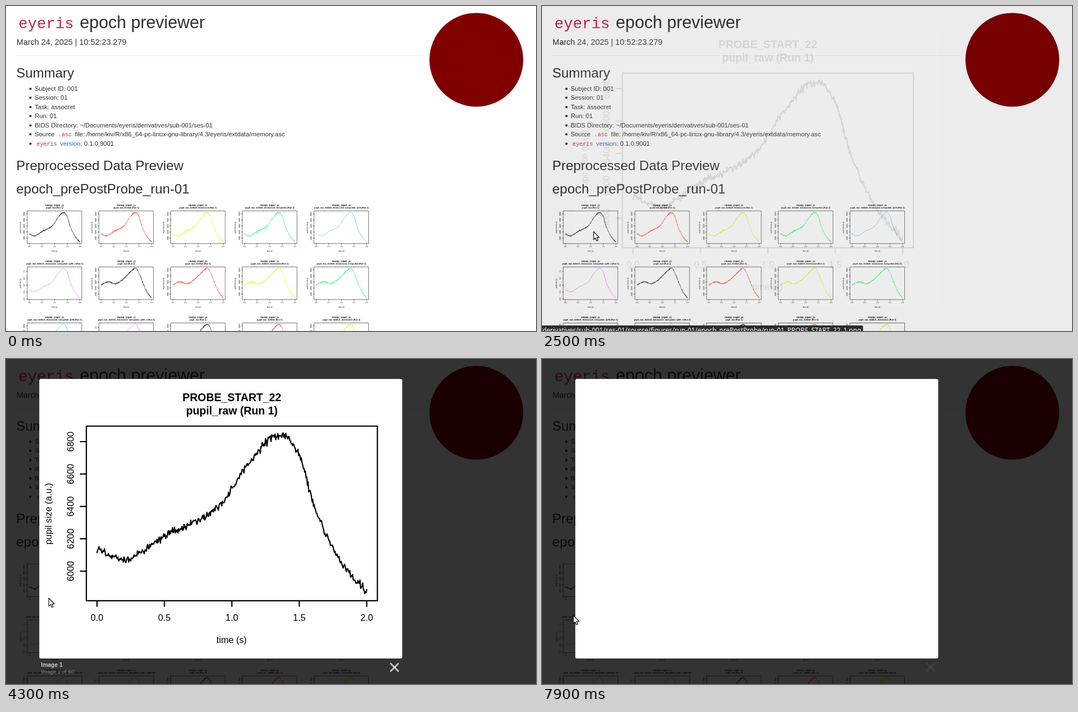
Recreate the animation shown at these times as an HTML page with a canvas. Size 955 by 586 pixels, loop 8000 ms.

```html
<!DOCTYPE html>
<html lang="en">
<head>
<meta charset="utf-8">
<title>eyeris epoch previewer</title>
<style>
html, body { margin: 0; width: 100%; height: 100%; overflow: hidden; background: #fff; }
canvas { display: block; }
</style>
</head>
<body>
<canvas id="stage" width="955" height="586"></canvas>
<script>
const W = 955, H = 586, LOOP = 8000, TICK = 100;
const SANS = '"Liberation Sans", Arial, sans-serif';
const MONO = '"Liberation Mono", monospace';
const UI = '"Noto Sans", sans-serif';
const PANEL = { x: 60, y: 36, w: 654, h: 504 };
const PLOT = { x: 144.8, y: 121, w: 524.4, h: 314.8 };
const AXIS = { x: 164, w: 486 };
const THUMB = { x: 22.7, y: 353.6, dx: 129.2, dy: 101, scale: 0.187 };
const INK = '#2f2f2f', RED = '#c7254e', LINK = '#3366bb';

const STAGES = ['raw', 'deblink', 'detransient', 'interpolate', 'lpfilt', 'z'];
const COLORS = ['#000', '#ff2a1a', '#cf0', '#0f6', '#3b8bf0', '#c3f'];

// Key points of the two pupil responses.
const RISE = [[164, 343], [218, 361], [290, 316], [330, 299], [388, 261], [435, 191],
  [490, 136], [526, 168], [558, 272], [600, 360], [650, 420]];
const BUMP = [[164, 294], [232, 264], [301, 283], [381, 234], [467, 150], [504, 137],
  [563, 263], [600, 352], [650, 421]];

const clamp = u => Math.min(Math.max(u, 0), 1);
const swing = u => 0.5 - Math.cos(clamp(u) * Math.PI) / 2;
const easeOut = u => 1 - (1 - clamp(u)) ** 2;

function spline(pts, x) {
  let i = 0;
  while (i < pts.length - 2 && pts[i + 1][0] < x) i++;
  const a = pts[i], b = pts[i + 1];
  const p = pts[Math.max(i - 1, 0)], n = pts[Math.min(i + 2, pts.length - 1)];
  const d = b[0] - a[0], u = (x - a[0]) / d;
  const m0 = (b[1] - p[1]) / (b[0] - p[0]) * d, m1 = (n[1] - a[1]) / (n[0] - a[0]) * d;
  const u2 = u * u, u3 = u2 * u;
  return (2 * u3 - 3 * u2 + 1) * a[1] + (u3 - 2 * u2 + u) * m0 +
    (3 * u2 - 2 * u3) * b[1] + (u3 - u2) * m1;
}

function random(seed) {
  return () => {
    seed = (seed * 1664525 + 1013904223) >>> 0;
    return seed / 4294967296;
  };
}

function layer(w, h, paint) {
  const c = document.createElement('canvas');
  c.width = w;
  c.height = h;
  paint(c.getContext('2d'));
  return c;
}

function text(g, str, x, y, font, color, align = 'left') {
  g.font = font;
  g.fillStyle = color;
  g.textAlign = align;
  g.fillText(str, x, y);
}

function upright(g, str, x, y, font) {
  g.save();
  g.translate(x, y);
  g.rotate(-Math.PI / 2);
  text(g, str, 0, 0, font, '#000', 'center');
  g.restore();
}

function segment(g, x1, y1, x2, y2) {
  g.beginPath();
  g.moveTo(x1, y1);
  g.lineTo(x2, y2);
  g.stroke();
}

function disc(g, x, y, r, color) {
  g.fillStyle = color;
  g.beginPath();
  g.arc(x, y, r, 0, 2 * Math.PI);
  g.fill();
}

function trace(g, probe, step) {
  const pts = probe === 23 ? BUMP : RISE;
  const rnd = random(probe * 977);
  const jitter = step > 3 ? 0 : 7, n = 400;
  g.beginPath();
  for (let i = 0; i <= n; i++) {
    const x = AXIS.x + AXIS.w * i / n;
    g.lineTo(x, spline(pts, x) + (rnd() + rnd() + rnd() - 1.5) * jitter);
  }
  g.stroke();
}

// Draws one chart in the coordinates of the full-size panel.
function chart(g, probe, step, lineWidth) {
  const font = '16.4px ' + SANS, bold = 'bold 19.7px ' + SANS;
  const scored = step === 5;
  const name = 'pupil_' + STAGES.slice(0, step + 1).join('_');
  text(g, 'PROBE_START_' + probe, 407, 76, bold, '#000', 'center');
  text(g, name + ' (Run 1)', 407, 99.5, bold, '#000', 'center');
  text(g, 'time (s)', 406.5, 512, font, '#000', 'center');
  upright(g, scored ? 'pupil size (z)' : 'pupil size (a.u.)', 82, 279, font);

  g.lineJoin = g.lineCap = 'round';
  g.strokeStyle = '#000';
  g.lineWidth = lineWidth;
  g.strokeRect(PLOT.x, PLOT.y, PLOT.w, PLOT.h);
  for (let i = 0; i < 5; i++) {
    const x = AXIS.x + AXIS.w * i / 4;
    segment(g, x, 436, x, 446);
    text(g, (i / 2).toFixed(1), x, 472, font, '#000', 'center');
    const y = scored ? 165 + 66 * i : 149 + 58.4 * i;
    segment(g, 134, y, PLOT.x, y);
    upright(g, scored ? (1.5 - i / 2).toFixed(1) : 6800 - 200 * i, 121.5, y, font);
  }
  g.strokeStyle = COLORS[step];
  trace(g, probe, step);
}

function summary(g) {
  const font = '11.35px ' + SANS, code = '10.25px ' + MONO;
  const rows = [
    'Subject ID: 001', 'Session: 01', 'Task: assocret', 'Run: 01',
    'BIDS Directory: ~/Documents/eyeris/derivatives/sub-001/ses-01', 'Source', ''
  ];
  rows.forEach((row, i) => {
    const y = Math.round(153 + 16.45 * i);
    disc(g, 44, y - 3.7, 2.1, INK);
    text(g, row, 51.7, y, font, INK);
  });
  text(g, '.asc', 94, 235, code, RED);
  text(g, 'file: /home/kiv/R/x86_64-pc-linux-gnu-library/4.3/eyeris/extdata/memory.asc',
    124.3, 235, font, INK);
  text(g, 'eyeris', 55, 252, code, RED);
  text(g, 'version', 97.6, 252, font, LINK);
  text(g, ': 0.1.0.9001', 134.5, 252, font, INK);
}

const page = layer(W, H, g => {
  const heading = '24.3px ' + SANS;
  g.fillStyle = '#fff';
  g.fillRect(0, 0, W, H);
  text(g, 'eyeris', 22.5, 40, '27.7px ' + MONO, RED);
  text(g, 'epoch previewer', 133, 40, '30.7px ' + SANS, INK);
  text(g, 'March 24, 2025 | 10:52:23.279', 19, 70, '14.57px ' + SANS, INK);
  g.fillStyle = '#eaeaea';
  g.fillRect(19, 89, 735, 1);
  text(g, 'Summary', 18.6, 129, heading, INK);
  summary(g);
  text(g, 'Preprocessed Data Preview', 18.6, 296, heading, INK);
  text(g, 'epoch_prePostProbe_run-01', 18.6, 338, heading, INK);
  disc(g, 847.5, 97, 84.5, '#800000');

  for (let i = 0; i < 15; i++) {
    g.save();
    g.translate(THUMB.x + THUMB.dx * (i % 5), THUMB.y + THUMB.dy * Math.floor(i / 5));
    g.scale(THUMB.scale, THUMB.scale);
    g.translate(-PANEL.x, -PANEL.y);
    chart(g, 22 + Math.floor(i / 6), i % 6, 3);
    g.restore();
  }
});

function panel(paint) {
  return layer(PANEL.w, PANEL.h, g => {
    g.fillStyle = '#fff';
    g.beginPath();
    g.roundRect(0, 0, PANEL.w, PANEL.h, 3);
    g.fill();
    g.translate(-PANEL.x, -PANEL.y);
    paint(g);
  });
}
const blank = panel(() => {});
const charts = [0, 1, 2, 3].map(step => panel(g => chart(g, 22, step, 2.2)));

const ARROW = new Path2D('M0 0V14.3L3.2 11.3L5.5 16.5L8 15.4L5.7 10.3H10.2Z');
const HAND = new Path2D('M-1.6 1Q0 -1 1.6 1V4.5Q3 3.7 4 5Q5.5 4.3 6.3 5.6Q9 5.3 9 8' +
  'L8 11.5V14H-0.3L-4.2 9Q-3.8 6.6 -1.6 8.6Z');

const OPEN = 2400, OPENED = 2900, NEXT = 7900;
const MOVES = [
  { from: 700, to: 1600, x: 99, y: 399 },
  { from: 1600, to: 1700, x: 99, y: 403 },
  { from: 2100, to: OPEN, x: 93, y: 407 },
  { from: 4200, to: 4600, x: 56.5, y: 462.5 }
];
const SLIDES = [{ from: 4700, to: 4900 }, { from: 5400, to: 5600 }, { from: 6400, to: 6700 }];

const progress = (t, span) => (t - span.from) / (span.to - span.from);

function pointer(g, t) {
  let x = 78, y = -95;
  for (const move of MOVES) {
    const u = easeOut(progress(t, move));
    x += (move.x - x) * u;
    y += (move.y - y) * u;
  }
  const shape = t < OPEN && y > THUMB.y ? HAND : ARROW;
  g.save();
  g.translate(x, y);
  g.fillStyle = '#fff';
  g.strokeStyle = '#111';
  g.lineWidth = 1.2;
  g.lineJoin = 'round';
  g.fill(shape);
  g.stroke(shape);
  g.restore();
}

function statusBar(g, t) {
  if (t >= OPENED) return;
  g.globalAlpha = swing((t - 1700) / 300);
  g.fillStyle = '#2b2b2b';
  g.beginPath();
  g.roundRect(-5, 576, 583.5, 20, 3);
  g.fill();
  text(g, '/derivatives/sub-001/ses-01/source/figures/run-01/epoch_prePostProbe/run-01_PROBE_START_22_1.png',
    575, 589, '11.85px ' + UI, '#fff', 'right');
  g.globalAlpha = 1;
}

function closeMark(g, alpha) {
  g.globalAlpha = alpha;
  g.strokeStyle = '#fff';
  g.lineWidth = 2.8;
  g.lineCap = 'butt';
  segment(g, 692.5, 548.5, 707.5, 563.5);
  segment(g, 707.5, 548.5, 692.5, 563.5);
  g.globalAlpha = 1;
}

function show(g, image, alpha) {
  g.globalAlpha = alpha;
  g.drawImage(image, PANEL.x, PANEL.y);
  g.globalAlpha = 1;
}

function lightbox(g, t) {
  // The picture holds at 2600 ms until the box is fully open.
  const open = swing(((t < OPENED ? Math.min(t, 2600) : t) - OPEN) / (OPENED - OPEN));
  if (!open) return;
  g.fillStyle = `rgba(0,0,0,${0.8 * open})`;
  g.fillRect(0, 0, W, H);

  if (t >= NEXT) {
    show(g, blank, 1);
    closeMark(g, 0.07);
    return;
  }
  show(g, charts[0], open);
  let count = 1;
  SLIDES.forEach((slide, i) => {
    const u = swing(progress(t, slide));
    show(g, charts[i + 1], u);
    if (u > 0) count = i + 2;
  });
  closeMark(g, 0.72 * open);
  if (open === 1) {
    text(g, 'Image 1', 63, 555, 'bold 10.5px ' + SANS, '#ccc');
    text(g, `Image ${count} of 60`, 63, 567, '9.8px ' + SANS, '#888');
  }
}

const stage = document.getElementById('stage').getContext('2d');
const begin = performance.now();

function draw() {
  const elapsed = (performance.now() - begin) % LOOP;
  const t = Math.floor(elapsed / TICK) * TICK;
  stage.drawImage(page, 0, 0);
  lightbox(stage, t);
  statusBar(stage, t);
  pointer(stage, t);
  requestAnimationFrame(draw);
}
draw();
</script>
</body>
</html>
```
